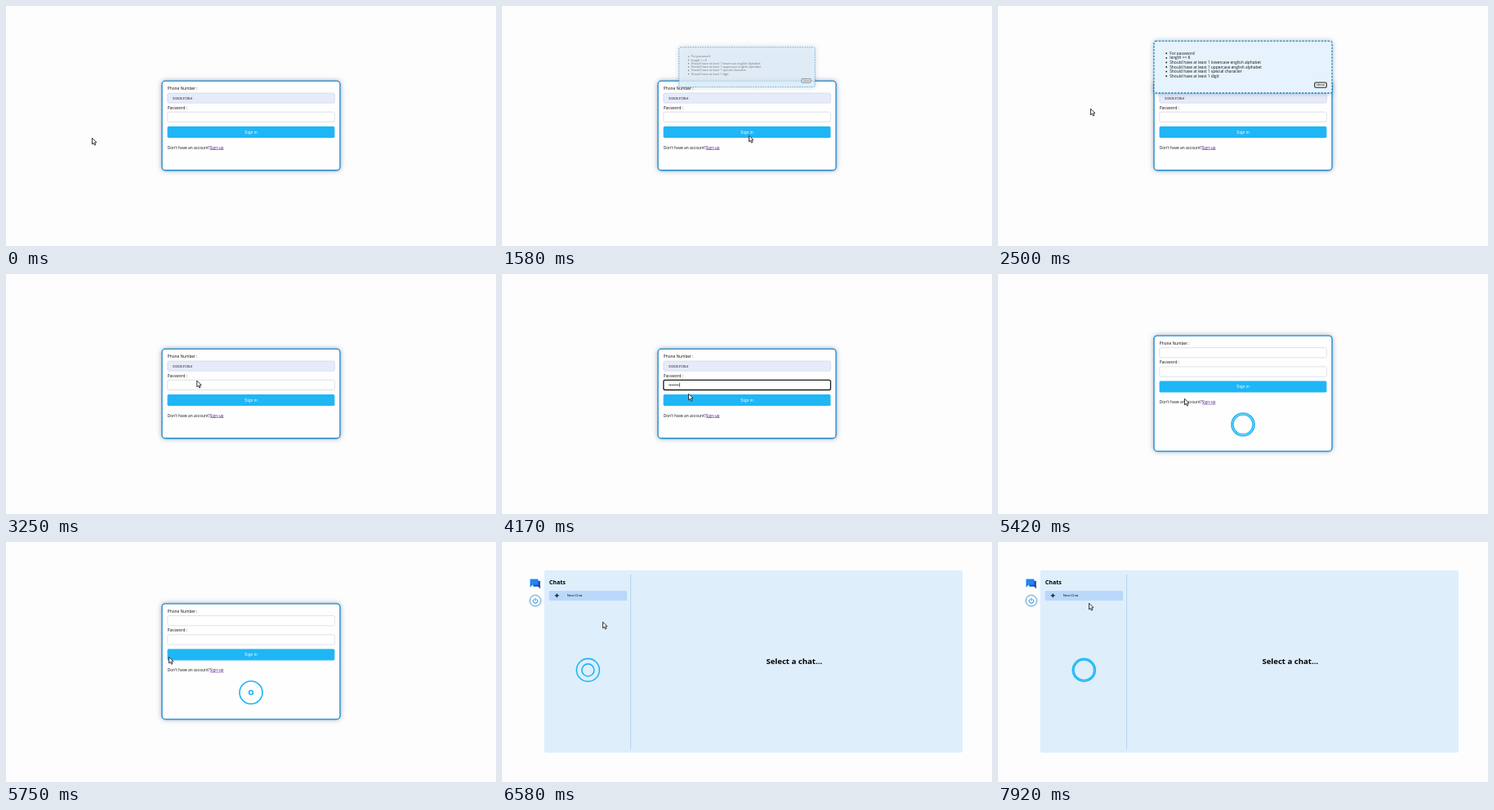
An HTML page with a canvas that plays this animation: 600x295 px, repeating every 8 s.

```html
<!DOCTYPE html>
<html lang="en">
<head>
<meta charset="utf-8">
<title>Chat sign in</title>
<style>
html, body { margin: 0; width: 100%; height: 100%; overflow: hidden; background: #fdfdfe; }
canvas { display: block; width: 600px; height: 295px; }
</style>
</head>
<body>
<canvas id="stage"></canvas>
<script>
const W = 600, H = 295, LOOP = 8000, FPS = 12;
const canvas = document.getElementById('stage');
const ctx = canvas.getContext('2d');
const dpr = window.devicePixelRatio || 1;
canvas.width = W * dpr;
canvas.height = H * dpr;

const UI = '"Open Sans", "Noto Sans", sans-serif';
const CONTROL = '"Liberation Sans", Arial, sans-serif';
const BLUE = '#1fb6f6', EDGE = '#1a86c8';
const PHONE = '5550137264';
const RULES = [
  'For password',
  'length >= 8',
  'Should have at least 1 lowercase english alphabet',
  'Should have at least 1 uppercase english alphabet',
  'Should have at least 1 special character',
  'Should have at least 1 digit'
];

const POPUP_IN = 1490, POPUP_OUT = 2700;
const FOCUS = 3330, TYPE = 3500, SUBMIT = 4580, CHAT = 6000;

// time, x, y of the pointer tip
const PATH = [
  [0, 105, 162], [80, 106, 162], [170, 108, 164], [330, 108, 164],
  [1000, 300, 163], [1250, 301, 168], [1580, 302, 159], [2000, 302, 158],
  [2400, 118, 129], [2500, 113, 126], [2700, 395, 96], [2830, 395, 96],
  [3300, 228, 132], [3700, 228, 132], [4170, 228, 147], [4400, 228, 153],
  [5480, 228, 153], [6080, 160, 125], [6580, 123, 98], [6920, 117, 93],
  [7750, 112, 82], [7920, 111, 75], [8000, 111, 75]
];

const clamp = v => Math.max(0, Math.min(1, v));
const smooth = v => v * v * (3 - 2 * v);

function pointerAt(t) {
  let i = 1;
  while (i < PATH.length - 1 && PATH[i][0] < t) i++;
  const [t0, x0, y0] = PATH[i - 1], [t1, x1, y1] = PATH[i];
  const k = smooth(clamp((t - t0) / (t1 - t0)));
  return [x0 + (x1 - x0) * k, y0 + (y1 - y0) * k];
}

function box(x, y, w, h, r, fill, stroke, line = 1) {
  ctx.beginPath();
  ctx.roundRect(x, y, w, h, r);
  if (fill) { ctx.fillStyle = fill; ctx.fill(); }
  if (stroke) { ctx.strokeStyle = stroke; ctx.lineWidth = line; ctx.stroke(); }
}

function shadowBox(x, y, w, h, r, fill, color, blur) {
  ctx.save();
  ctx.shadowColor = color;
  ctx.shadowBlur = blur * dpr;
  box(x, y, w, h, r, fill);
  ctx.restore();
}

function text(s, x, y, size, { font = UI, color = '#111', align = 'left', weight = 400 } = {}) {
  ctx.font = `${weight} ${size}px ${font}`;
  ctx.fillStyle = color;
  ctx.textAlign = align;
  ctx.fillText(s, x, y);
  return ctx.measureText(s).width;
}

function ring(x, y, r, line, color) {
  ctx.beginPath();
  ctx.arc(x, y, r, 0, Math.PI * 2);
  ctx.strokeStyle = color;
  ctx.lineWidth = line;
  ctx.stroke();
}

function polygon(points, fill) {
  ctx.beginPath();
  points.forEach(([x, y]) => ctx.lineTo(x, y));
  ctx.closePath();
  ctx.fillStyle = fill;
  ctx.fill();
}

function spinner(x, y, age) {
  const grow = (age / 1000) % 1;
  ring(x, y, 14, 1.6, BLUE);
  ring(x, y, 14.4 * grow, 1.6, BLUE);
}

function field(y, fill, focused) {
  box(197.8, y, 204.6, 12.2, 2, fill, focused ? '#1b1b1b' : '#d2d4d8', focused ? 1.3 : 0.7);
}

function drawForm(t) {
  const loading = t >= SUBMIT;
  const focused = t >= FOCUS && !loading;
  const top = loading ? 75.8 : 92.2;
  const height = loading ? 142 : 109.8;

  shadowBox(191, top, 218, height, 4, '#fefefe', 'rgba(70,105,135,.65)', 6);
  box(191, top, 218, height, 4, '#fefefe', EDGE, 1.3);

  ctx.save();
  ctx.translate(0, top - 92.2);
  text('Phone Number :', 197.8, 103, 4.8);
  field(107, loading ? '#fff' : '#e6ebfb');
  if (!loading) text(PHONE, 204, 114.6, 4.3, { font: CONTROL });

  text('Password :', 197.8, 126.7, 4.8);
  field(130.3, '#fff', focused);
  if (focused) drawPassword(t);

  box(197.6, 148, 204.8, 14, 1.5, BLUE);
  text('Sign in', 300, 156.7, 5.2, { font: CONTROL, color: '#f4fbff', align: 'center' });

  const w = text("Don't have an account?", 197.8, 175.6, 4.8);
  const x = 197.8 + w;
  const link = text('Sign-up', x, 175.6, 4.8, { color: '#551a8b' });
  ctx.fillRect(x, 176.2, link, 0.5);
  ctx.restore();

  if (loading) spinner(300, 185, t - SUBMIT);
}

function drawPassword(t) {
  const count = Math.round(8 * clamp((t - TYPE) / 600));
  ctx.fillStyle = '#222';
  for (let i = 0; i < count; i++) {
    ctx.beginPath();
    ctx.arc(204.9 + i * 1.6, 136.4, 0.65, 0, Math.PI * 2);
    ctx.fill();
  }
  const typing = t >= TYPE && t < TYPE + 900;
  if (typing || (t - FOCUS) % 1000 < 500) ctx.fillRect(204.3 + count * 1.6, 133.8, 0.6, 5.2);
}

function drawPopup(t) {
  if (t < POPUP_IN || t >= POPUP_OUT) return;
  const k = 1 - (1 - clamp((t - POPUP_IN) / 300)) ** 2;
  const scale = 0.5 + 0.5 * k;

  ctx.save();
  ctx.globalAlpha = k;
  ctx.translate(300, 75);
  ctx.scale(scale, scale);
  ctx.translate(-300, -75);

  shadowBox(191, 43.2, 218, 63.8, 2, '#e6f3fd', 'rgba(70,105,135,.55)', 6);
  ctx.setLineDash([2.4, 1.5]);
  box(191, 43.2, 218, 63.8, 2, '#e6f3fd', EDGE, 1.3);
  ctx.setLineDash([]);

  RULES.forEach((rule, i) => {
    const y = 58 + i * 5.6;
    text(rule, 210.2, y + 1.8, 4.85);
    ctx.beginPath();
    ctx.arc(206.2, y + 0.2, 0.9, 0, Math.PI * 2);
    ctx.fill();
  });

  box(387.7, 94, 14.6, 6.2, 1.5, '#efefef', '#222', 1.1);
  text('close', 395, 98.4, 4.3, { font: CONTROL, align: 'center' });
  ctx.restore();
}

function drawSidebar() {
  box(38.2, 47.8, 8.6, 7, 0.8, '#1b4dbb');
  polygon([[43.5, 54], [46.8, 54], [46.8, 57.6]], '#1b4dbb');
  box(34.4, 45.4, 9.8, 7.4, 0.8, '#2383f5');
  polygon([[34.4, 51.5], [38, 52.5], [34.4, 55.8]], '#2383f5');

  shadowBox(34.2, 65.6, 13.2, 13.2, 6.6, '#fff', 'rgba(60,110,150,.5)', 3);
  ring(40.8, 72.2, 6.6, 0.9, '#3f9fdc');
  ctx.beginPath();
  ctx.arc(40.8, 72.5, 2.8, -Math.PI / 2 + 0.65, Math.PI * 1.5 - 0.65);
  ctx.moveTo(40.8, 68.9);
  ctx.lineTo(40.8, 72.2);
  ctx.strokeStyle = '#1f7fc4';
  ctx.lineWidth = 1;
  ctx.stroke();
}

function drawChat(t) {
  drawSidebar();
  box(51.6, 34.8, 512.4, 224.2, 3.5, '#deeefb');
  ctx.fillStyle = '#b4d0ee';
  ctx.fillRect(157.2, 40, 0.9, 214.5);

  text('Chats', 57.8, 52, 7.1, { weight: 700, color: '#000' });
  box(57.6, 60, 95.4, 12, 1.5, '#b9d8fb');
  ctx.fillStyle = '#111';
  ctx.fillRect(64.8, 65.2, 4.8, 1.2);
  ctx.fillRect(66.6, 63.4, 1.2, 4.8);
  text('New Chat', 79.8, 67.4, 4.2, { font: CONTROL });

  text('Select a chat...', 357.8, 150.2, 9.6, { weight: 700, color: '#000', align: 'center' });
  spinner(105.3, 157.4, t - CHAT - 60 + 1000);
}

function drawPointer(x, y) {
  const shape = [[0, 0], [0, 7.6], [1.8, 6.1], [3, 8.8], [4.3, 8.2], [3.1, 5.6], [5.5, 5.4]];
  ctx.beginPath();
  shape.forEach(([dx, dy]) => ctx.lineTo(x + 0.5 + dx, y + 0.3 + dy));
  ctx.closePath();
  ctx.fillStyle = '#fff';
  ctx.fill();
  ctx.strokeStyle = '#222';
  ctx.lineWidth = 0.9;
  ctx.lineJoin = 'round';
  ctx.stroke();
}

function draw(t) {
  ctx.setTransform(dpr, 0, 0, dpr, 0, 0);
  ctx.fillStyle = '#fdfdfe';
  ctx.fillRect(0, 0, W, H);
  if (t < CHAT) {
    drawForm(t);
    drawPopup(t);
  } else {
    drawChat(t);
  }
  drawPointer(...pointerAt(t));
}

const start = performance.now();
function tick() {
  const t = (performance.now() - start) % LOOP;
  draw(Math.floor((t + 5) * FPS / 1000) * 1000 / FPS % LOOP);
  requestAnimationFrame(tick);
}
tick();
</script>
</body>
</html>
```
